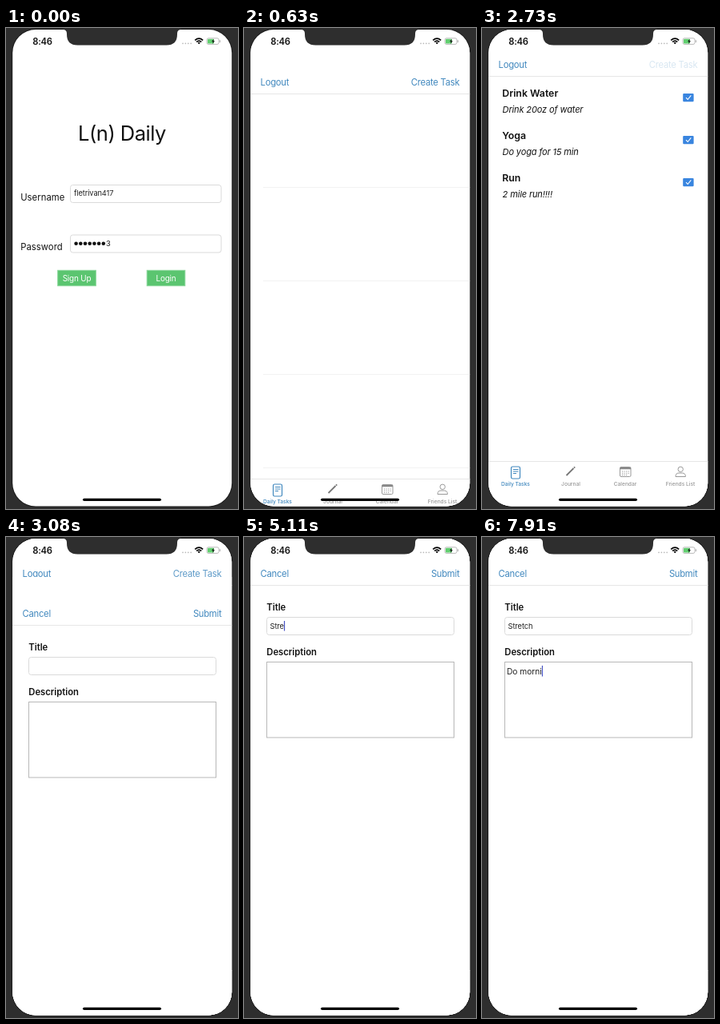
An HTML page for the animation above (8 s loop, 290 by 602 pixels).

```html
<!DOCTYPE html>
<html lang="en">
<head>
<meta charset="utf-8">
<title>Habit tracker</title>
<style>
  html, body { margin: 0; width: 100%; height: 100%; overflow: hidden; background: #2e2e2e; }
  svg { display: block; width: 290px; height: 602px; }
  text { font: 11.25px Inter, Roboto, sans-serif; fill: #111; white-space: pre; }
  .nav text { letter-spacing: -.27px; fill: #4188be; }
  .end { text-anchor: end; }
  .mid { text-anchor: middle; }
  .title { font-size: 25.5px; letter-spacing: -.5px; }
  .label { letter-spacing: .06px; }
  .small { font-size: 9.27px; letter-spacing: -.1px; fill: #222; }
  .button { font-size: 9.9px; letter-spacing: -.15px; fill: #fff; }
  .green { fill: #5bc570; stroke: #86d596; }
  .bold { font-weight: 600; }
  .task { font-size: 12.3px; font-weight: 600; }
  .note { font-size: 11px; font-style: italic; letter-spacing: -.12px; }
  .area { font-size: 10.2px; fill: #222; }
  .tab { fill: none; stroke: #999; }
  .tab text { font-size: 6.62px; font-weight: 500; fill: #999; stroke: none; }
  .tab.on { stroke: #4188be; }
  .tab.on text { fill: #4188be; }
  .field { fill: #fff; stroke: #dadada; }
  .line { fill: none; stroke: #e6e6e6; }
  .caret { fill: #4653c4; }
</style>
</head>
<body>
<svg viewBox="0 0 290 602">
  <defs>
    <clipPath id="screen"><rect x="8.2" y="2" width="274" height="596.5" rx="29"/></clipPath>
  </defs>
  <rect width="290" height="602" fill="#2e2e2e"/>
  <rect x="7.2" y="1" width="276" height="598.5" rx="30" fill="#1c1c1c"/>

  <g clip-path="url(#screen)">
    <g id="login">
      <rect width="290" height="602" fill="#fff"/>
      <text class="title mid" x="145" y="140.5">L(n) Daily</text>
      <text class="label" x="18.2" y="215.5">Username</text>
      <text class="label" x="18.2" y="278">Password</text>
      <rect class="field" x="80.5" y="196.5" width="188.5" height="22" rx="3"/>
      <rect class="field" x="80.5" y="259" width="188.5" height="22" rx="3"/>
      <text class="small" x="85" y="210.3">fletrivan417</text>
      <g id="bullets"></g>
      <text id="lastChar" class="small" x="125" y="273">3</text>
      <rect class="green" x="64.7" y="303.3" width="47.6" height="19.4"/>
      <rect class="green" x="176.2" y="303.3" width="47.6" height="19.4"/>
      <text class="button mid" x="88.5" y="316.7">Sign Up</text>
      <text class="button mid" x="200" y="316.7">Login</text>
    </g>

    <g id="list">
      <rect width="290" height="602" fill="#fff"/>
      <g class="nav">
        <text x="20.6" y="50">Logout</text>
        <text id="create" class="end" x="269.3" y="50">Create Task</text>
        <path class="line" d="M8 60.5H283"/>
      </g>
      <path id="rows" d="M24 177.5H283M24 294.5H283M24 411.5H283M24 528.5H283" stroke="#f2f2f2"/>
      <g id="tasks"></g>
      <rect y="542" width="290" height="60" fill="#fff"/>
      <path class="line" d="M8 542.5H283"/>
      <g class="tab on">
        <rect x="36.5" y="549" width="11" height="15" rx="1.8" stroke-width="1.2"/>
        <path d="M39 552.5H45.5M39 555H45.5M39 557.5H43"/>
        <text class="mid" x="42" y="572.5">Daily Tasks</text>
      </g>
      <g class="tab">
        <path d="M105.5 560L114.5 551M115 550.5L116.2 549.3" stroke="#777" stroke-width="1.8"/>
        <text class="mid" x="111" y="572.5">Journal</text>
      </g>
      <g class="tab">
        <rect x="172.5" y="549.5" width="13.5" height="12" rx="1.5"/>
        <path d="M172.5 551H186" stroke="#888" stroke-width="2.4"/>
        <path d="M175 555H184.5M175 557.3H184.5M175 559.5H182" stroke-dasharray="1.2 1.3"/>
        <text class="mid" x="179" y="572.5">Calendar</text>
      </g>
      <g class="tab">
        <circle cx="248.2" cy="552.3" r="3.2"/>
        <path d="M242 561.5Q242 557 246 557H250.4Q254.4 557 254.4 561.5Z"/>
        <text class="mid" x="248" y="572.5">Friends List</text>
      </g>
    </g>

    <g id="form">
      <rect width="290" height="602" fill="#fff"/>
      <g class="nav">
        <text x="20.6" y="50">Cancel</text>
        <text class="end" x="269.3" y="50">Submit</text>
        <path class="line" d="M8 60.5H283"/>
      </g>
      <text class="bold" x="28.3" y="92.4">Title</text>
      <text class="bold" x="28.3" y="148.4">Description</text>
      <rect class="field" x="28.5" y="100.5" width="234" height="22" rx="3"/>
      <rect x="28.5" y="156.5" width="234" height="94.5" fill="#fff" stroke="#b8b8b8"/>
      <text id="titleText" class="small" x="32.6" y="114.6"></text>
      <text id="noteText" class="area" x="31" y="171.6"></text>
      <rect id="titleCaret" class="caret" y="105" width="1.2" height="12.5"/>
      <rect id="noteCaret" class="caret" y="161" width="1.2" height="13.5"/>
    </g>
  </g>

  <path d="M71 0V2Q76 2 76 7V8Q76 21.5 89.5 21.5H200.5Q214 21.5 214 8V7Q214 2 219 2V0Z" fill="#2e2e2e"/>
  <text class="bold" x="33.3" y="20.8" letter-spacing="-.3">8:46</text>
  <path d="M221 19.3H232" stroke="#bbb" stroke-width="1.8" stroke-linecap="round" stroke-dasharray="0 3.4"/>
  <g fill="none" stroke="#000" stroke-width="1.6">
    <path d="M236.2 15.3Q241.2 10.9 246.2 15.3M238.1 17.4Q241.2 14.7 244.3 17.4"/>
    <path d="M239.6 18.4Q241.2 17.3 242.8 18.4L241.2 20.2Z" fill="#000" stroke="none"/>
  </g>
  <rect x="251" y="12.8" width="15" height="7.6" rx="2" fill="#fff" stroke="#aaa" stroke-width=".8"/>
  <rect x="252" y="13.8" width="8" height="5.6" rx="1" fill="#62cf70"/>
  <path d="M267.4 15.2V18" stroke="#aaa"/>
  <path d="M259.8 13.8L257 17H258.7L258 19.8L261 16.2H259.2Z" fill="#111"/>
  <rect x="96" y="588.7" width="98" height="3.3" rx="1.65"/>
</svg>

<script>
const $ = id => document.getElementById(id);
const LOOP = 8000, STEP = 70;
const LIST_AT = 329, FORM_AT = 2838;

const titleKeys = [[3850, ''], [4410, 'S'], [4830, 'St'], [5040, 'Str'], [5110, 'Stre'], [5250, 'Stret'],
  [5460, 'Stretc'], [5740, 'Stret'], [5950, 'Stretc'], [6160, 'Stretch']];
const noteKeys = [[6300, ''], [7000, 'D'], [7280, 'Do'], [7420, 'Do '], [7560, 'Do m'], [7630, 'Do mo'],
  [7700, 'Do mor'], [7840, 'Do morn'], [7910, 'Do morni']];

$('bullets').innerHTML = Array.from({ length: 8 }, (_, i) =>
  `<circle cx="${87.6 + i * 5.7}" cy="269.7" r="2.3" fill="#111"/>`).join('');

$('tasks').innerHTML = [['Drink Water', 'Drink 20oz of water'], ['Yoga', 'Do yoga for 15 min'], ['Run', '2 mile run!!!!']]
  .map(([name, note], i) => `<g transform="translate(0 ${i * 53})">
    <text class="task" x="25.3" y="85.7">${name}</text>
    <text class="note" x="25.6" y="105.8">${note}</text>
    <rect x="251.2" y="81.9" width="13.4" height="10.4" rx="1.2" fill="#3985df"/>
    <path d="M255 87.2L257.2 89.5L261.3 84.4" fill="none" stroke="#fff" stroke-width="1.1"/></g>`).join('');

const show = (id, on) => $(id).setAttribute('visibility', on ? 'visible' : 'hidden');

// Critically damped spring that brings a page up from below.
function slide(id, t, start) {
  const k = Math.max(0, t - start) * .017;
  const y = Math.floor(602 * (1 + k) * Math.exp(-k) + .1);
  $(id).setAttribute('transform', `translate(0 ${y})`);
}

function type(field, keys, t, focused) {
  const key = keys.findLast(([at]) => at <= t);
  const text = $(field + 'Text'), caret = $(field + 'Caret');
  text.textContent = key ? key[1] : '';
  show(field + 'Caret', key && focused);
  caret.setAttribute('x', +text.getAttribute('x') + text.getComputedTextLength());
}

function draw(now) {
  const t = Math.floor(now % LOOP / STEP) * STEP;
  show('lastChar', t < 70);
  $('bullets').lastChild.setAttribute('visibility', t < 70 ? 'hidden' : 'visible');
  slide('list', t, LIST_AT);
  slide('form', t, FORM_AT);
  show('rows', t < 910);
  show('tasks', t >= 1050);
  $('create').setAttribute('opacity', t < 2730 ? 1 : Math.min(1, .2 + .8 * Math.max(0, t - 2870) / 260));
  type('title', titleKeys, t, t < 6300);
  type('note', noteKeys, t, true);
  requestAnimationFrame(draw);
}
requestAnimationFrame(draw);
</script>
</body>
</html>
```
